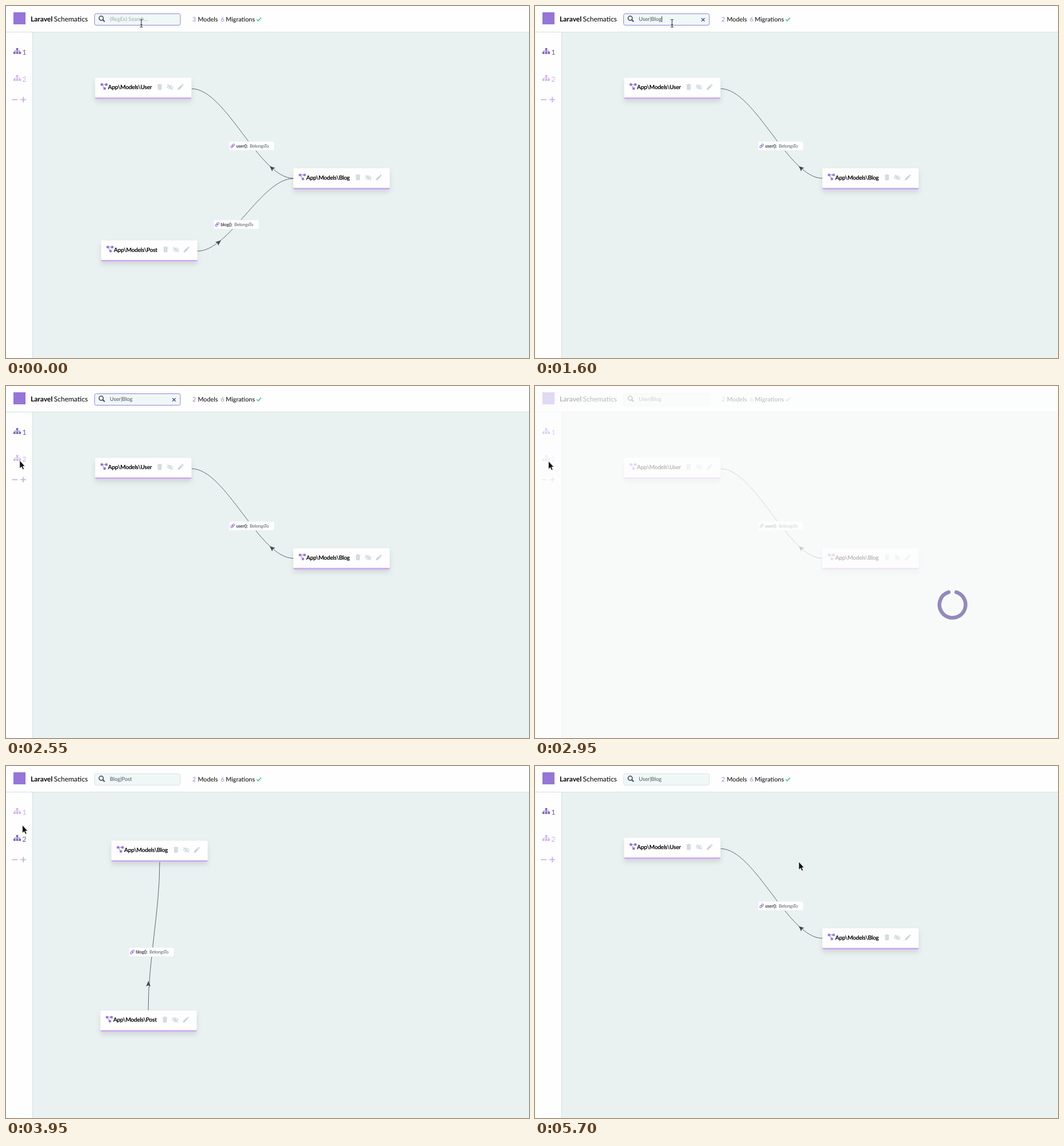
An HTML page for the animation above (5.8 s loop, 912 px wide and 614 px high).

```html
<!DOCTYPE html>
<html lang="en">
<head>
<meta charset="utf-8">
<title>Schematics</title>
<style>
  html, body { margin: 0; width: 100%; height: 100%; overflow: hidden; background: #eaf2f1; }
  svg { display: block; font-family: Lato, "Open Sans", sans-serif; white-space: pre; text-rendering: geometricPrecision; }
  .card > .box { filter: drop-shadow(0 5px 4px #2b3a4a24); }
  .name { font-size: 10.2px; font-weight: 700; letter-spacing: -.035em; }
  .label { font-size: 8px; letter-spacing: -.025em; fill: #555c66; }
  .bold { font-weight: 700; }
  .label.bold { fill: #3f454d; }
  .edge { fill: none; stroke: #4d565f; stroke-width: .9; }
  .stat { font-size: 10.8px; }
  .field { font-size: 9.33px; }
  .num { fill: #9b86d6; }
</style>
</head>
<body>
<svg id="stage" width="912" height="614" viewBox="0 0 912 614"></svg>
<script>
const DARK = '#6f4fc0', PALE = '#cfadee', LOOP = 5800, TICK = 50;
const at = (x, y, body, more = '') => `<g transform="translate(${x} ${y})" ${more}>${body}</g>`;
const rect = (x, y, w, h, more = '') => `<rect x="${x}" y="${y}" width="${w}" height="${h}" ${more}/>`;
const line = (d, color, width, more = '') =>
  `<path d="${d}" fill="none" stroke="${color}" stroke-width="${width}" ${more}/>`;
const text = (x, y, cls, s, more = '') => `<text x="${x}" y="${y}" class="${cls}" ${more}>${s}</text>`;

const diagram = at(10, 10, rect(0, 0, 4, 4) + rect(8, 0, 4, 4) + rect(5, 7, 4, 4) +
  line('M3 2H9M3 3L6.5 8', '#9575d8', 1), 'fill="#9575d8"');

const tools = at(0, 16.5,
  '<path d="M109 -4.5h8v1.2h-8zM109.6 -2.7h6.8l-.4 7.2h-6zM111.5 -5.4h3v1h-3z"/>' +
  line('M111.7 -1.5V3M113 -1.5V3M114.3 -1.5V3', '#eef3f4', .5) +
  line('M126 0Q131 -6.4 136 0Q131 6.4 126 0Z', '#c8d5db', 1.1) +
  '<circle cx="131" cy="0" r="1.8"/>' + line('M126.5 -4.5L135.8 4.5', '#c8d5db', 1.2) +
  '<path d="M144.3 5l.6 -2.9 5.5 -5.5 2.3 2.3 -5.5 5.5zM151 -4l1 -1q.6 -.5 1.2 0l1.1 1.1q.5 .6 0 1.2l-1 1z"/>',
  'fill="#c8d5db"');

const card = (x, y, model) => at(x, y,
  `<g class="box">${rect(.4, .3, 168, 37, 'rx="2" fill="#fdfefd"')}
   <path d="M.4 34.5H168.4V35.5Q168.4 37.3 166.4 37.3H2.4Q.4 37.3 .4 35.5Z" fill="#cda9ef"/></g>` +
  diagram + text(22.8, 20.3, 'name', 'App\\Models\\' + model) + tools, 'class="card"');

const link = x => `<rect x="${x - 2.3}" y="-1.5" width="4.6" height="3" rx="1.5"/>`;
const chain = `<g transform="translate(6.2 8) rotate(-45)" fill="none" stroke="#9575d8" stroke-width="1.1">
  ${link(-1.7)}${link(1.7)}</g>`;

const label = (x, y, fn) => at(x, y,
  rect(0, 0, 79, 16, 'rx="2" fill="#fefefe" stroke="#dfe7e8" stroke-width=".5"') + chain +
  text(12.2, 10.8, 'label bold', fn + '():') + text(36, 10.8, 'label', 'BelongsTo'));

// control points sit a third of the way along the main axis
const across = (x, y, x2, y2) => {
  const d = (x2 - x) / 3;
  return `M${x} ${y}C${x + d} ${y} ${x2 - d} ${y2} ${x2} ${y2}`;
};
const down = (x, y, x2, y2) => {
  const d = (y2 - y) / 3;
  return `M${x} ${y}C${x} ${y + d} ${x2} ${y2 - d} ${x2} ${y2}`;
};
const edge = (d, x, y, angle) => `<path class="edge" d="${d}"/>
  <path d="M0 -5L4 4.5L0 2.6L-4 4.5Z" fill="#3d4854" transform="translate(${x} ${y}) rotate(${angle})"/>`;

const sitemap = (y, n) => `<g id="tab${n}">` + at(13, y,
  rect(4.7, 0, 3.6, 3.2) + rect(0, 6.8, 3.6, 3.2) + rect(4.7, 6.8, 3.6, 3.2) + rect(9.4, 6.8, 3.6, 3.2) +
  line('M6.5 3V7M1.8 7V5H11.2V7', 'currentColor', .9) +
  text(15.4, 11.6, '', n, 'font-size="12"')) + '</g>';

stage.innerHTML = `
  ${rect(0, 0, 912, 614, 'fill="#eaf2f1"')}
  <g id="post">
    ${edge(across(334, 427.5, 501, 301), 371, 412, 50)}
    ${label(362, 373, 'blog')}${card(165.3, 408.5, 'Post')}
  </g>
  <g id="first">
    ${edge(across(324, 144.3, 501, 300.5), 463.5, 282.5, -48)}
    ${label(389, 236, 'user')}${card(155, 125, 'User')}${card(500.7, 282.7, 'Blog')}
  </g>
  <g id="second">
    ${edge(down(248, 426, 268, 167), 248.3, 380, 1)}
    ${label(214, 316.5, 'blog')}${card(183.3, 130, 'Blog')}${card(164.1, 426.2, 'Post')}
  </g>
  ${rect(0, 0, 912, 45.5, 'fill="#fdfefd"')}${rect(0, 45, 46, 569, 'fill="#fdfefd"')}
  ${line('M0 45.5H912M46.5 46V614', '#d3dfe4', 1)}
  ${rect(13, 11, 21, 21, 'fill="#9575d8"')}
  ${text(43, 27, 'bold', 'Laravel', 'font-size="12"')}${text(83.5, 27, '', 'Schematics', 'font-size="12"')}
  ${rect(154.5, 13.5, 149.5, 20, 'id="field" rx="3" fill="#f0f7f7"')}
  <circle cx="166" cy="21.3" r="3.7" fill="none" stroke="#3c4052" stroke-width="1.5"/>
  ${line('M168.8 24.1L172 27.3', '#3c4052', 2)}
  ${text(181, 26, 'field', '', 'id="query"')}
  ${line('M221.2 18V28', '#222', .9, 'id="caret"')}
  ${line('M290.3 21.3L295.7 26.7M295.7 21.3L290.3 26.7', '#4d5a8c', 1.6, 'id="clear"')}
  ${text(325, 26.7, 'stat num', '3', 'id="count"')}${text(334.5, 26.7, 'stat', 'Models')}
  ${text(374.5, 26.7, 'stat num', '6')}${text(383.3, 26.7, 'stat', 'Migrations')}
  ${line('M437.2 23.4L439.7 25.9L444.8 20.3', '#55d09a', 1.8)}
  ${sitemap(73.5, 1)}${sitemap(120.5, 2)}
  ${line('M10.5 163.3H20M25.3 163.3H35M30.2 158.5V168', PALE, 1.8)}
  <g id="loader">
    ${rect(0, 0, 912, 614, 'fill="#fefefe" opacity=".73"')}
    <circle id="ring" cx="728" cy="381.5" r="22.8" fill="none" stroke="#9389bd" stroke-width="6.5"
      stroke-linecap="round" pathLength="360" stroke-dasharray="326 34"/>
  </g>
  <g id="pointer">
    <path id="arrow" d="M0 0V14L3.2 11.2L5.3 16L7.6 15L5.5 10.3H9.3Z" fill="#111" stroke="#fff" stroke-width=".7"/>
    ${line('M-2.5 -6.5Q0 -6.5 0 -5Q0 -6.5 2.5 -6.5M0 -5V5.5M-2.5 7Q0 7 0 5.5Q0 7 2.5 7M-1.5 2.5H1.5', '#333', 1.1, 'id="beam"')}
  </g>`;

const el = id => document.getElementById(id);
const show = (id, on) => el(id).style.display = on ? '' : 'none';
const tint = (id, color) => { el(id).style.color = color; el(id).setAttribute('fill', color); };
const clamp = (v, lo, hi) => Math.min(hi, Math.max(lo, v));

// time, x, y of the pointer
const path = [[0, 236, 30], [1550, 236, 30], [1600, 239, 30], [2050, 51, 76], [2250, 30, 108], [2600, 23.5, 131],
  [3750, 23.5, 131], [3950, 28.5, 103], [4250, 28.5, 103], [4300, 24, 82], [5450, 24, 82], [5700, 460, 167], [LOOP, 460, 167]];

function pointerAt(t) {
  const i = path.findIndex(p => p[0] > t), [t0, x0, y0] = path[i - 1], [t1, x1, y1] = path[i];
  const k = (t - t0) / (t1 - t0), e = k * k * (3 - 2 * k);
  return [x0 + (x1 - x0) * e, y0 + (y1 - y0) * e];
}

// two ticks to cover the page, then a number of ticks to uncover it
const veil = (t, start, end, ticks) =>
  t < start ? 0 : t < end ? clamp((t - start + TICK) / (2 * TICK), 0, 1)
    : clamp(1 - ((t - end) / TICK + 1) / ticks, 0, 1);

function draw(now) {
  const t = Math.floor(now % LOOP / TICK) * TICK;
  const second = t >= 3500 && t < 5150, empty = t < 200, focused = t < 2900, typing = !empty && focused;

  show('first', !second);
  show('second', second);
  show('post', t < 1000);
  el('count').textContent = t < 1000 ? 3 : 2;
  tint('tab1', second ? PALE : DARK);
  tint('tab2', second ? DARK : PALE);

  el('query').textContent = empty ? '(RegEx) Search...' : second ? 'Blog|Post' : 'User|Blog';
  tint('query', empty ? '#a3aab0' : '#4b5158');
  el('field').setAttribute('stroke', focused ? '#9585d4' : '#dae5e8');
  show('clear', typing);
  show('caret', typing && Math.floor((t - 200) / 600) % 2 === 0);

  el('loader').setAttribute('opacity', t < 4000 ? veil(t, 2900, 3500, 4) : veil(t, 4300, 5150, 5));
  const turn = 15 * (t < 4000 ? clamp((t - 2950) / TICK, 0, 5) : clamp((t - 4600) / TICK, 0, 4));
  el('ring').setAttribute('transform', `rotate(${turn - 73} 728 381.5)`);

  const [x, y] = pointerAt(t), inField = x > 154 && x < 304 && y < 34;
  el('pointer').setAttribute('transform', `translate(${x} ${y})`);
  show('beam', inField);
  show('arrow', !inField);
}

const begin = performance.now();
(function loop() {
  draw(performance.now() - begin);
  requestAnimationFrame(loop);
})();
</script>
</body>
</html>
```
